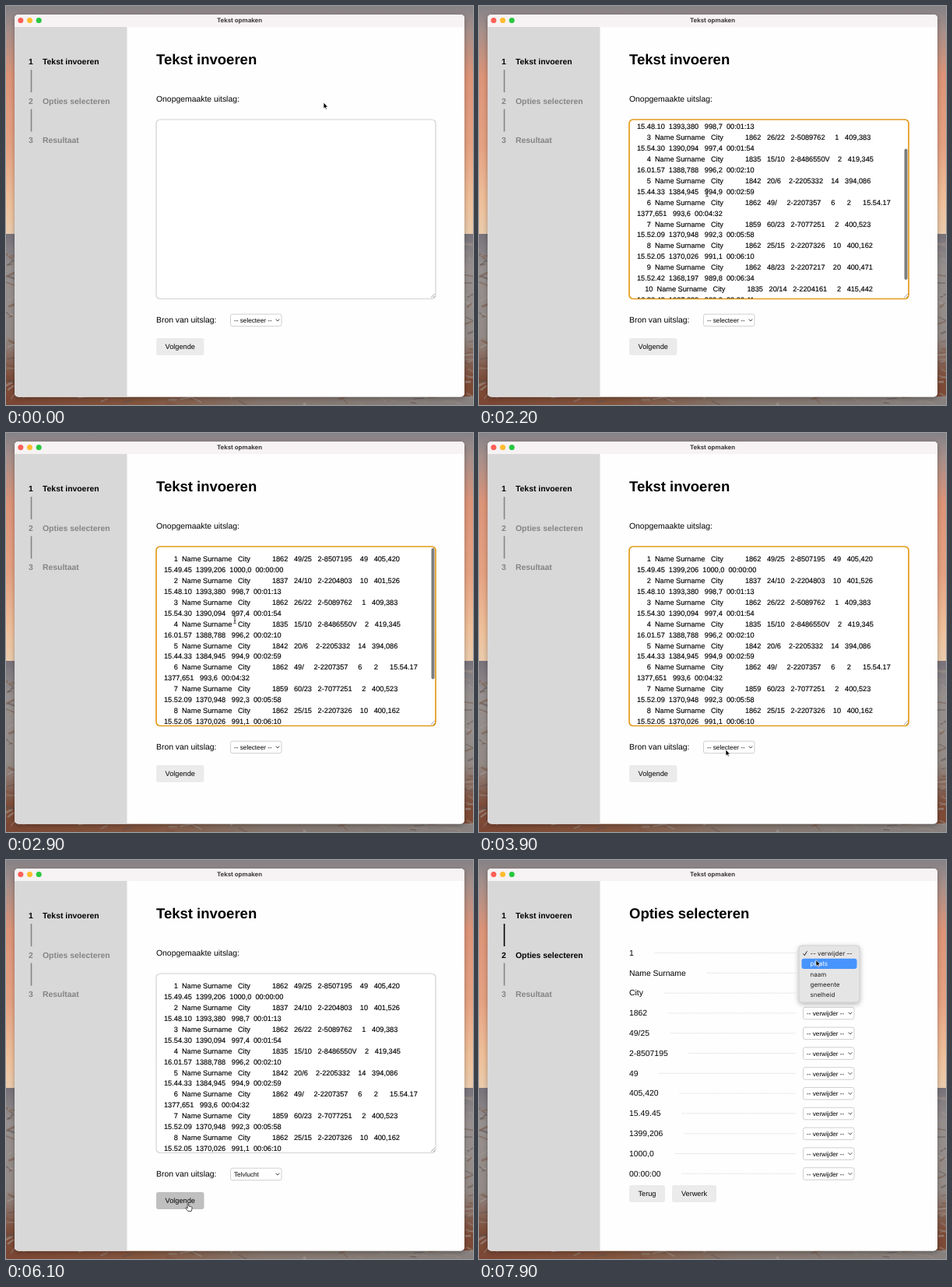
Write an HTML page that moves like this. It is 600x513 px and loops after 8000 ms.

```html
<!DOCTYPE html>
<html lang="nl">
<head>
<meta charset="utf-8">
<title>Tekst opmaken</title>
<style>
html, body { margin: 0; width: 600px; height: 513px; overflow: hidden; }
svg { display: block; }
text { font-family: "Liberation Sans", Arial, sans-serif; white-space: pre; text-rendering: geometricPrecision; }
.ui { font-family: Inter, sans-serif; }
.bold { font-weight: bold; }
</style>
</head>
<body>
<svg id="stage" width="600" height="513" viewBox="0 0 600 513">
  <defs>
    <linearGradient id="sky" x2="0" y2="1">
      <stop offset="0" stop-color="#858286"/><stop offset=".1" stop-color="#a58f8b"/>
      <stop offset=".3" stop-color="#dd9478"/><stop offset=".6" stop-color="#e5a283"/>
      <stop offset=".85" stop-color="#efc19c"/><stop offset="1" stop-color="#e9cdb0"/>
    </linearGradient>
    <linearGradient id="cliff" x2="0" y2="1">
      <stop offset="0" stop-color="#77727a"/><stop offset=".2" stop-color="#96908f"/>
      <stop offset=".6" stop-color="#938a86"/><stop offset=".85" stop-color="#7d4a36"/>
    </linearGradient>
    <linearGradient id="rock">
      <stop offset="0" stop-color="#7b4633"/><stop offset=".3" stop-color="#84563f"/>
      <stop offset=".55" stop-color="#85766d"/><stop offset="1" stop-color="#87817f"/>
    </linearGradient>
    <filter id="shadow" x="-20%" y="-20%" width="140%" height="150%">
      <feDropShadow dx="0" dy="2" stdDeviation="3" flood-opacity=".3"/>
    </filter>
    <clipPath id="window"><rect x="11" y="11" width="578" height="491.5" rx="5"/></clipPath>
    <clipPath id="area"><rect x="194" y="147" width="357" height="229"/></clipPath>
  </defs>
</svg>
<script>
const stage = document.getElementById('stage');

function add(parent, tag, attrs = {}) {
  const el = document.createElementNS('http://www.w3.org/2000/svg', tag);
  set(el, attrs);
  parent.append(el);
  return el;
}
function set(el, attrs) {
  for (const key in attrs) el.setAttribute(key, attrs[key]);
}
const group = (parent, attrs) => add(parent, 'g', attrs);
const box = (parent, x, y, width, height, fill, attrs) =>
  add(parent, 'rect', { x, y, width, height, fill, ...attrs });
const path = (parent, d, stroke, width = 1, attrs) =>
  add(parent, 'path', { d, fill: 'none', stroke, 'stroke-width': width, ...attrs });

// y is the vertical middle of the capitals
function label(parent, x, y, size, str, attrs) {
  const el = add(parent, 'text', { x, y: y + size * .36, 'font-size': size, ...attrs });
  el.textContent = str;
  return el;
}
function button(parent, x, y, width, str) {
  const face = box(parent, x, y, width, 22, '#ebebeb', { rx: 3 });
  label(parent, x + width / 2, y + 11, 9.2, str, { 'text-anchor': 'middle' });
  return face;
}
function select(parent, x, y, str) {
  box(parent, x + .5, y - 7.5, 65.5, 15.5, '#fff', { rx: 2.5, stroke: '#cfcfcf' });
  path(parent, `M${x + 58.5} ${y - 1}l2.4 2.4 2.4 -2.4`, '#444');
  return label(parent, x + 5, y + .5, 8.2, str);
}

const ROW = 13.4;
function menu(x, y, width, items) {
  const g = group(stage);
  box(g, x, y - 10, width, (items.length - 1) * ROW + 19.5, '#e6e5e6',
    { rx: 4, stroke: '#bdbdbd', 'stroke-width': .6, filter: 'url(#shadow)' });
  const bar = box(g, x + 3.5, 0, width - 7, ROW, '#4794fd', { rx: 3 });
  const tick = path(g, `M${x + 5.5} ${y + .3}l1.8 2.4 3.2 -5.4`, '#222');
  const texts = items.map((s, i) => label(g, x + 14.5, y + i * ROW, 8, s, { class: 'ui' }));
  return (opacity, cursorY) => {
    const active = Math.max(0, Math.min(items.length - 1, Math.round((cursorY - y) / ROW)));
    set(g, { opacity });
    set(bar, { y: y + (active - .5) * ROW });
    set(tick, { stroke: active ? '#222' : '#fff' });
    texts.forEach((el, i) => set(el, { fill: i === active ? '#fff' : '#222' }));
  };
}

// Wallpaper
box(stage, 0, 0, 600, 300, 'url(#sky)');
box(stage, 0, 293, 600, 220, 'url(#cliff)');
box(stage, 0, 502, 600, 11, 'url(#rock)');
let seed = 7;
const random = () => (seed = seed * 16807 % 2147483647) / 2147483647;
const tones = ['#aaa3a0', '#5b4f4d', '#9a8b82', '#77533f'];
for (let i = 0; i < 90; i++) {
  const side = i % 3;
  const x = side === 0 ? random() * 10 - 4 : side === 1 ? 587 + random() * 8 : random() * 600;
  const y = side === 2 ? 503 + random() * 8 : 300 + random() * 205;
  path(stage, `M${x} ${y}l${6 + random() * 10} ${random() * 16 - 8}`,
    tones[Math.floor(random() * 4)], 1 + random() * 2, { opacity: .5 });
}

// Window
box(stage, 11, 11, 578, 491.5, '#fff', { rx: 5, filter: 'url(#shadow)' });
const win = group(stage, { 'clip-path': 'url(#window)' });
box(win, 11, 11, 578, 491.5, '#fefefe');
box(win, 11, 27, 144.5, 476, '#d9d8d9');
box(win, 11, 11, 578, 16, '#f7f2f3');
['#fe5f57', '#febc2e', '#28c840'].forEach((fill, i) =>
  add(win, 'circle', { cx: 18.8 + i * 11.7, cy: 18.5, r: 3.5, fill }));
label(win, 300, 18, 7.8, 'Tekst opmaken',
  { class: 'ui bold', 'text-anchor': 'middle', fill: '#3c3a3b' });

const steps = ['Tekst invoeren', 'Opties selecteren', 'Resultaat'].map((name, i) => {
  const g = group(win, { class: 'bold' });
  const y = 71.5 + i * 50.3;
  label(g, 29, y, 10.4, i + 1);
  label(g, 47, y, 10.4, name);
  return g;
});
const links = [82, 132.5].map(y => path(win, `M32.5 ${y}v29`, '#858485', 1.6));

// Page 1
const input = group(win);
label(input, 193, 68.5, 18.5, 'Tekst invoeren', { class: 'bold' });
label(input, 193, 119, 10.4, 'Onopgemaakte uitslag:');
const frame = box(input, 193, 146, 359, 230.5, '#fff', { rx: 5 });
const lines = group(group(input, { 'clip-path': 'url(#area)' }), { stroke: '#000', 'stroke-width': .15 });
[
  '1862   49/25   2-8507195    49   405,420|15.49.45  1399,206  1000,0  00:00:00',
  '1837   24/10   2-2204803    10   401,526|15.48.10  1393,380   998,7  00:01:13',
  '1862   26/22   2-5089762     1   409,383|15.54.30  1390,094   997,4  00:01:54',
  '1835   15/10   2-8486550V    2   419,345|16.01.57  1388,788   996,2  00:02:10',
  '1842   20/6    2-2205332    14   394,086|15.44.33  1384,945   994,9  00:02:59',
  '1862   49/     2-2207357     6      2      15.54.17|1377,651   993,6  00:04:32',
  '1859   60/23   2-7077251     2   400,523|15.52.09  1370,948   992,3  00:05:58',
  '1862   25/15   2-2207326    10   400,162|15.52.05  1370,026   991,1  00:06:10',
  '1862   48/23   2-2207217    20   400,471|15.52.42  1368,197   989,8  00:06:34',
  '1835   20/14   2-2204161     2   415,442|16.02.49  1367,633   988,8  00:06:41',
].forEach((row, i) => {
  const [first, second] = row.split('|');
  const y = 162 + i * 27.8;
  label(lines, 203, y, 9.2, String(i + 1).padStart(6) + '  Name Surname   City           ' + first);
  label(lines, 203, y + 13.9, 9.2, second);
});
const thumb = box(input, 546.5, 148, 4, 168.5, '#7d7d7d', { rx: 2 });
const caret = box(input, 203, 157, .8, 10.5, '#000');
path(input, 'M546 375l5 -5M549 375l2 -2', '#888', .7);
label(input, 193, 403.5, 10.4, 'Bron van uitslag:');
const sourceName = select(input, 288, 403.7, '');
const next = button(input, 193, 427, 61.5, 'Volgende');

// Page 2
const options = group(win);
label(options, 193, 68.5, 18.5, 'Opties selecteren', { class: 'bold' });
['1', 'Name Surname', 'City', '1862', '49/25', '2-8507195', '49', '405,420',
  '15.49.45', '1399,206', '1000,0', '00:00:00'].forEach((value, i) => {
  const y = 119 + i * 25.8;
  const from = 220 + label(options, 193, y, 10.4, value).getComputedTextLength();
  path(options, `M${from} ${y + .5}H407`, '#d4d4d4', .8, { 'stroke-dasharray': '1.3 .9' });
  select(options, 416, y + .4, '-- verwijder --');
});
button(options, 193, 418, 46, 'Terug');
button(options, 248, 418, 57, 'Verwerk');

const sourceMenu = menu(282, 404, 79, ['-- selecteer --', 'QVDZ', 'Telvlucht']);
const fieldMenu = menu(411, 120, 78, ['-- verwijder --', 'plaats', 'naam', 'gemeente', 'snelheid']);

// Pointers, each with its hot spot at 0,0
const arrow = path(stage, 'M0 0V8L1.8 6.4 3 9.1 4.3 8.5 3.1 5.9H5.6Z', '#fff', .7, { fill: '#000' });
const beam = path(stage, 'M-1.8 -5Q0 -5 0 -4V4Q0 5 -1.8 5M1.8 -5Q0 -5 0 -4M0 4Q0 5 1.8 5M-1 1.5H1', '#333', .9);
const hand = path(stage, 'M-.8 .5Q0 -.6 .8 .5V3.5L4.5 4.5Q5.4 5 5 6.5L4.2 10H-.2L-3.2 6.2Q-3.4 5 -2.2 5.3L-.8 6.5Z',
  '#222', .8, { fill: '#fff' });

const route = [
  [0, 408, 124], [100, 408, 124], [700, 293, 240], [2300, 293, 240], [2900, 294, 240],
  [3200, 294, 240], [3800, 317, 407], [4400, 317, 407], [4800, 323, 432], [5200, 323, 432],
  [5900, 234, 441.5], [6600, 234, 441.5], [7300, 440, 118], [7600, 440, 118], [7800, 433, 128.5], [8000, 433, 128.5],
];
function ease(t, from, to) {
  const u = Math.max(0, Math.min(1, (t - from) / (to - from)));
  return u * u * (3 - 2 * u);
}
function pointerAt(t) {
  const i = route.findIndex(p => p[0] > t);
  const [t0, x0, y0] = route[i - 1], [t1, x1, y1] = route[i];
  const u = ease(t, t0, t1);
  return [x0 + (x1 - x0) * u, y0 + (y1 - y0) * u];
}
const show = (el, on) => { el.style.display = on ? '' : 'none'; };
const between = (v, a, b) => v >= a && v < b;

function draw(t) {
  const [x, y] = pointerAt(t);
  const second = t >= 6500;
  const inside = (left, top, right, bottom) => between(x, left, right) && between(y, top, bottom);

  show(input, !second);
  show(options, second);
  steps.forEach((g, i) => set(g, { fill: i === 0 || second && i === 1 ? '#000' : '#858485' }));
  set(links[0], { stroke: second ? '#000' : '#858485' });

  const focus = between(t, 800, 4300);
  set(frame, { stroke: focus ? '#e39a1b' : '#d2d2d2', 'stroke-width': focus ? 1.7 : 1.2 });
  show(caret, between(t, 800, 1200));

  const scroll = 81 * (1 - ease(t, 1940, 2540));
  show(lines, t >= 1500);
  set(lines, { transform: `translate(0 ${-scroll})` });
  show(thumb, between(t, 1500, 3200));
  set(thumb, { y: 148 + scroll * .73 });

  sourceName.textContent = t < 5200 ? '-- selecteer --' : 'Telvlucht';
  const onButton = !second && inside(193, 427, 254.5, 449);
  set(next, { fill: onButton ? '#bfbfbf' : '#ebebeb' });
  sourceMenu(between(t, 4300, 5300) ? Math.min(1, 1 - (t - 5000) / 300) : 0, y + 1);
  fieldMenu(t >= 7500 ? 1 : 0, y + 3);

  const onText = !second && inside(193, 146, 552, 376);
  [[hand, onButton], [beam, onText], [arrow, !onButton && !onText]].forEach(([el, on]) => {
    show(el, on);
    set(el, { transform: `translate(${x} ${y})` });
  });
}

function tick() {
  draw(Math.floor(performance.now() % 8000 / 100) * 100);
  requestAnimationFrame(tick);
}
tick();
</script>
</body>
</html>
```
